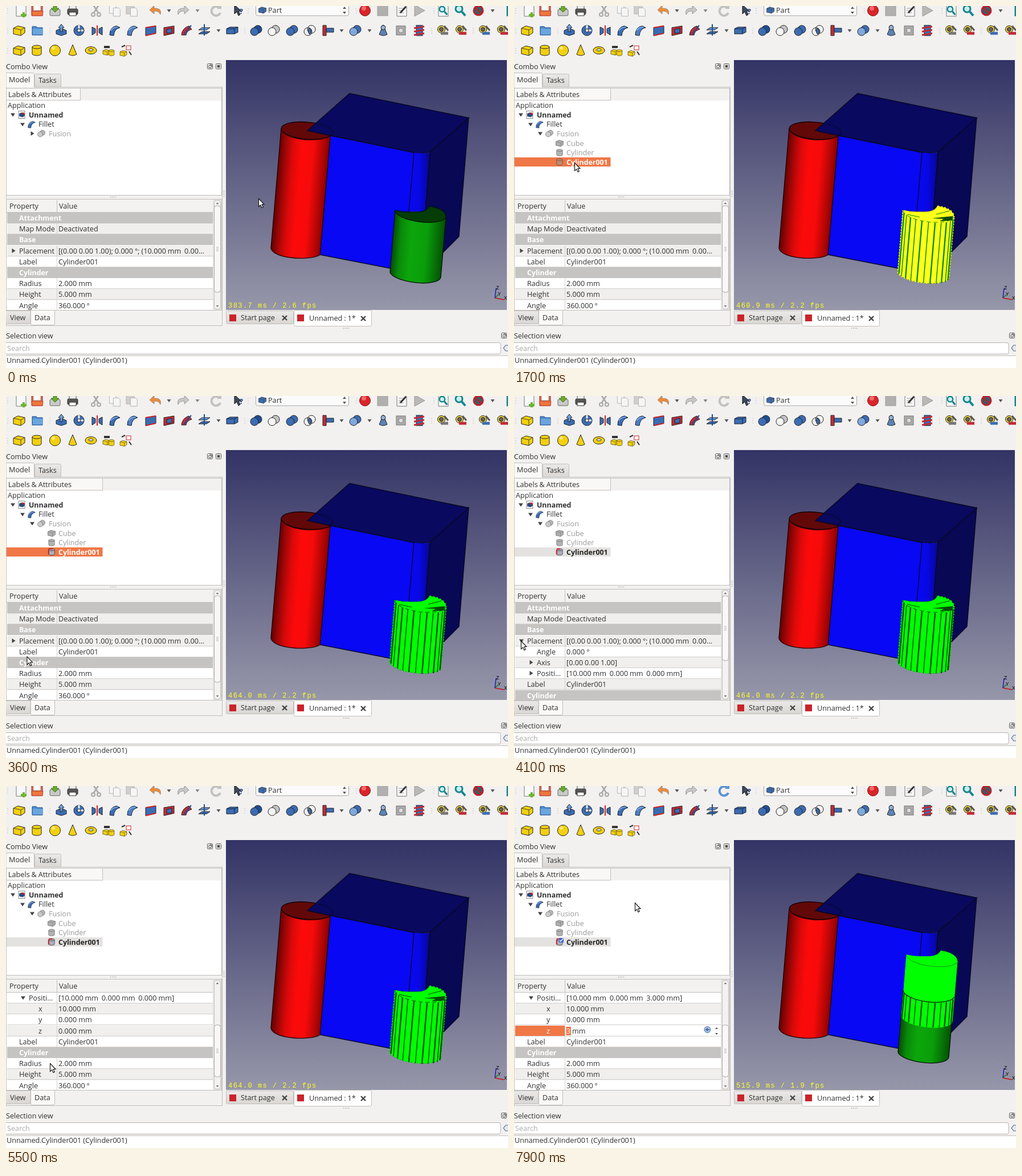
An HTML page for the animation above (8000 ms loop, 881x636 px).

```html
<!DOCTYPE html>
<html lang="en">
<head>
<meta charset="utf-8">
<title>Moving a cylinder</title>
<style>
html, body { margin: 0; width: 100%; height: 100%; overflow: hidden; background: #f2f1f0; }
svg { display: block; }
text { font: 12.65px "Open Sans", "Noto Sans", sans-serif; word-spacing: -.4px; fill: #303030; white-space: pre; }
.b { font-weight: 700; font-size: 12.4px; }
.fps { font: 12px "Liberation Mono", monospace; letter-spacing: 1.45px; word-spacing: 0; fill: #ffff20; }
.axis { font: 9px "Liberation Mono", monospace; fill: #000; }
</style>
</head>
<body>
<svg id="stage" width="881" height="636" viewBox="0 0 881 636">
  <defs>
    <linearGradient id="sky" x2="0" y2="1"><stop stop-color="#333365"/><stop offset="1" stop-color="#9797aa"/></linearGradient>
    <linearGradient id="red" gradientUnits="userSpaceOnUse" x1="474" y1="320" x2="561" y2="327">
      <stop stop-color="#600"/><stop offset=".12" stop-color="#9c0606"/><stop offset=".28" stop-color="#dc0909"/>
      <stop offset=".45" stop-color="#fd0a0a"/><stop offset=".68" stop-color="#f60a0a"/><stop offset=".9" stop-color="#ac0505"/><stop offset="1" stop-color="#800"/>
    </linearGradient>
    <linearGradient id="green" gradientUnits="userSpaceOnUse" x1="679" y1="420" x2="768" y2="427">
      <stop stop-color="#065006"/><stop offset=".14" stop-color="#098a09"/><stop offset=".35" stop-color="#0ca60c"/>
      <stop offset=".65" stop-color="#0a9e0a"/><stop offset="1" stop-color="#045004"/>
    </linearGradient>
    <linearGradient id="round"><stop stop-color="#0808f4"/><stop offset=".5" stop-color="#0808e4"/><stop offset="1" stop-color="#060690"/></linearGradient>
    <linearGradient id="tab" x2="0" y2="1"><stop stop-color="#ebe9e7"/><stop offset="1" stop-color="#d9d6d3"/></linearGradient>
    <clipPath id="rows"><rect x="2" y="363" width="361" height="171"/></clipPath>
    <clipPath id="view"><rect x="386" y="95" width="493" height="439"/></clipPath>
  </defs>
  <g id="frame"></g><g id="tree"></g><g id="props"></g><g id="scene" clip-path="url(#view)"></g><g id="sync"></g><g id="pointer"></g>
</svg>
<script>
const LOOP = 8000, TICK = 100;
const YEL = '#f3d00f', BLU = '#3b6cb3', NAVY = '#1d4e95', GREY = '#a9a8a6', ORANGE = '#f07746', LINE = '#c2bfbb';
const $ = id => document.getElementById(id);

const path = (d, fill = 'none', stroke = '#222', w = 1, more = '') =>
  `<path d="${d}" fill="${fill}" stroke="${stroke}" stroke-width="${w}" ${more}/>`;
const rect = (x, y, w, h, fill, stroke = 'none', r = 0) =>
  `<rect x="${x}" y="${y}" width="${w}" height="${h}" rx="${r}" fill="${fill}" stroke="${stroke}"/>`;
const disc = (x, y, r, fill, stroke = '#222', w = 1) =>
  `<circle cx="${x}" cy="${y}" r="${r}" fill="${fill}" stroke="${stroke}" stroke-width="${w}"/>`;
const text = (x, y, s, fill = '', cls = '') =>
  `<text x="${x}" y="${y}" class="${cls}" ${fill && `style="fill:${fill}"`}>${s.replace('&', '&amp;')}</text>`;
const at = (x, y, s, k = 1) => `<g transform="translate(${x} ${y}) scale(${k})">${s}</g>`;
const faded = s => `<g opacity=".7">${s}</g>`;

// Toolbar glyphs, drawn around their own centre
const cube = c => path('M-10-4L-2-8L10-5V4L3 9L-10 6Z', c) + path('M-10-4L3-1L10-5M3-1V9', 'none', '#443');
const drum = c => path('M-8-6V6A8 3 0 0 0 8 6V-6Z', c) + `<ellipse cy="-6" rx="8" ry="3" fill="${c}" stroke="#222"/>`;
const cone = c => path('M0-10L7 7Q0 11-7 7Z', c);
const ring = c => `<ellipse rx="10" ry="6.5" fill="${c}" stroke="#222"/><ellipse cy="-1" rx="4" ry="2" fill="#eee" stroke="#222"/>`;
const fan = c => path('M-9 8Q-9-6 3-8L9-5Q-1-3-2 9Z', c, '#123') + path('M-7 0Q-3-6 5-6', 'none', '#8db4e8', 1.5);
const slab = c => path('M-9-5L9-8V5L-9 9Z', c);
const pair = (a, b) => disc(3, -2, 7, b) + disc(-3, 2, 7, a);
const page = () => path('M-8-11H5L9-7V10H-8Z', '#f8f8f8', '#777');
const lens = c => disc(-2, -3, 6, '#c9eef0', c, 3) + path('M3 2L9 9', 'none', c, 4);
const curl = c => path('M9 7Q12-5-2-4V-9L-10-1L-2 6V1Q6 0 9 7Z', c, '#8a8a8a', .8);
const drop = path('M-3.5-2H3.5L0 3Z', '#555', 'none');
const grip = path('M0-4V5', 'none', '#c9c6c2', 2, 'stroke-dasharray="1 3"');
const tape = c => disc(-3, -2, 6.5, '#e8cf42') + disc(-3, -2, 3.5, '#666') + path('M-4 5H9', 'none', c, 5) + path('M2-8L9 0', 'none', '#555', 3);
const spin = c => path('M7-4A8 8 0 1 0 8 4', 'none', c, 4) + path('M2-3H10V-11Z', c, 'none');

function toolbar() {
  const flip = s => `<g transform="scale(-1 1)">${s}</g>`;
  const save = rect(-9, -2, 18, 11, '#c9c9c9', '#666', 2) + path('M-3-11H3V-4H7L0 3L-7-4H-3Z', '#6aab2e', '#47781c');
  const row1 = [
    [26, page() + path('M5 3V12M0 8H10', 'none', '#69b52c', 4)],
    [55, path('M-10-9H9V9H-10Z', '#e45a32', '#a33') + path('M-7-12H6V0H-7Z', '#fafafa', '#999') + path('M-10 1H10L9 9H-9Z', '#f0763c', '#b43')],
    [86, save],
    [117, rect(-9, -3, 18, 10, '#555', '#333', 2) + rect(-6, -11, 12, 8, '#eee', '#555') + rect(-6, 3, 12, 6, '#fff', '#333')],
    [158, path('M-5-10L4 4M5-10L-4 4', 'none', GREY, 2.5) + disc(-5, 7, 3, 'none', GREY, 2) + disc(5, 7, 3, 'none', GREY, 2)],
    [190, faded(at(-3, -2, page(), .7) + at(4, 3, page(), .7))],
    [220, faded(rect(-9, -10, 14, 16, '#c4c2bf', '#999') + at(4, 3, page(), .7))],
    [262, curl('#f08a35')], [286, drop], [311, flip(curl('#c9c8c6'))], [336, faded(drop)],
    [409, path('M-8-10V6L-4 2L-1 9L2 7L-1 1H4Z', '#3c4a5c', '#111') + text(1, 6, '?', '#173a8c', 'b')],
    [630, disc(0, 0, 9.5, '#d9252a', '#8c1014') + disc(-2, -4, 4, '#f06a6a', 'none')],
    [661, rect(-9, -9, 18, 18, '#b2b0ae', '#999')],
    [694, page() + path('M-5-4H4M-5 0H2M-5 4H4', 'none', '#999') + path('M-2 4L8-7', 'none', '#333', 3)],
    [725, path('M-8-10L10 0L-8 10Z', '#b9b8b5', '#999')],
    [767, page() + at(0, 0, lens('#16858f'), .8)], [797, lens('#16858f')],
    [829, disc(0, 0, 8, '#28656c', '#c21d2a', 3) + path('M-6-6L6 6', 'none', '#c21d2a', 3)], [854, drop],
    [884, path('M-4-10V10', 'none', '#16858f', 3)]
  ];
  const row2 = [
    [23, cube(YEL)], [55, path('M-9-7H-2L0-5H9V8H-9Z', '#4e8ccb', NAVY) + rect(-8, -3, 17, 10, '#6ba5dd')],
    [97, path('M-9 0L0-4L9 0V6L0 9L-9 6Z', BLU) + path('M0-11L5-5H2V2H-2V-5H-5Z', '#6ea3e0')],
    [128, disc(0, 0, 9, BLU) + path('M0-9V0H8', 'none', '#e9f0fa', 3) + disc(0, 0, 3, '#ddd')],
    [160, path('M-9-6L-3-3V4L-9 8ZM9-6L3-3V4L9 8Z', BLU) + path('M0-9V9', 'none', '#c22', 2)],
    [191, fan(BLU)], [222, fan('#4e7fc4')], [254, slab(BLU) + path('M-9-5L9-8M-9 9L9 5', 'none', '#c22', 2)],
    [286, slab('#c22b36') + path('M-4-2L5-4V4L-4 5Z', BLU)],
    [317, path('M-9 8Q-8-4 4-8L9-2Q0 0-1 8Z', '#c22b36') + path('M-5 7L8-9', 'none', NAVY, 2)],
    [348, path('M-10 6L-4 2H10L4 6Z', BLU) + path('M-10-1L-4-5H10L4-1Z', '#6b9adb') + path('M0-11V9', 'none', NAVY, 2)], [373, drop],
    [397, path('M-10-3L-4-6H10V3L4 6H-10Z', BLU) + path('M-10-3H4L10-6M4-3V6', 'none', '#124')],
    [439, pair(BLU, NAVY)], [470, pair('#f5f5f5', '#c4c4c4')], [502, pair(BLU, BLU)],
    [533, pair('none', '#f2f2f2') + path('M-1-5Q6 0 0 7Q-5 2-1-5', BLU)],
    [565, path('M-9-9H-3V9H-9Z', '#c22b36') + path('M-3-4H10V3H-3Z', BLU)], [589, drop],
    [613, pair('#7fa8dc', BLU)], [638, drop], [662, cone('#5b83b5') + disc(0, -5, 4, '#92b2d8')],
    [693, rect(-8, -8, 16, 16, '#aaa', '#777') + disc(0, 0, 4, '#ddd', '#888')],
    [725, rect(-5, -9, 11, 18, BLU, '#123') + path('M-9-4L9-7M-9 2L9-1M-9 8L9 5', 'none', '#c22b36', 3)],
    [767, tape('#777')], [799, tape('#c22b36')], [840, tape(BLU)], [872, tape('#c22b36')]
  ];
  const row3 = [
    [23, cube(YEL)], [54, drum(YEL)], [86, disc(0, 0, 9.5, YEL) + disc(-3, -4, 3, '#fbe879', 'none')], [117, cone(YEL)], [149, ring(YEL)],
    [180, at(-4, 3, cube(YEL), .6) + at(5, 4, drum(YEL), .6) + path('M-8-6H2', 'none', '#333', 4)],
    [211, at(-5, 5, cube(YEL), .6) + rect(0, -8, 8, 7, '#fff', '#c22') + path('M-8-6L-2-9M5 2L9 8', 'none', '#333', 2)]
  ];
  let s = '';
  [row1, row2, row3].forEach((row, i) => row.forEach(([x, g]) => s += at(x, [8, 43, 78][i], g)));
  [[3, 8], [425, 8], [615, 8], [751, 8], [3, 43], [77, 43], [419, 43], [747, 43], [820, 43], [3, 78]].forEach(([x, y]) => s += at(x, y, grip));
  s += rect(438.5, -6, 163, 23, '#fbfbfb', '#aaa6a2', 3) + at(450, 7, cube(BLU), .65) + text(460, 12, 'Part');
  return s + path('M591 5L594 1L597 5ZM591 10L594 14L597 10Z', '#555', 'none');
}

const floater = (x, y) => at(x, y, rect(-4.5, -4.5, 9, 9, '#f6f5f4', '#555', 1) + rect(-2, -1.5, 4, 4, 'none', '#555') + path('M0-3H3V1', 'none', '#555'));
const cross = (x, y, r) => at(x, y, path(`M${-r} ${-r}L${r} ${r}M${r} ${-r}L${-r} ${r}`, 'none', '#444', 2.4));
const dots = (x, y, d) => path(`M${x} ${y}${d}`, 'none', '#aaa6a2', 2, 'stroke-dasharray="1 2"');

function chrome() {
  return rect(0, 0, 881, 636, '#f2f1f0') + toolbar() +
    text(0, 111, 'Combo View') + floater(358, 106) + rect(368.5, 101.5, 9, 9, '#f6f5f4', '#555', 1) + cross(373, 106, 2) +
    rect(50.5, 119.5, 46, 24, 'url(#tab)', LINE, 2) + text(57, 135, 'Tasks') +
    rect(.5, 142.5, 379, 419, '#f2f1f0', LINE) +
    path('M0 143V117.500H47Q49.500 117.500 49.500 120V143', '#f9f8f7', LINE) + text(5, 134, 'Model') +
    rect(.5, 144.5, 378, 188, '#fff', LINE) +
    rect(.5, 339.5, 378, 195, '#fff', LINE) + rect(1, 340, 362, 22, '#f3f2f1') + path('M1 362.500H363M89.500 341V362', 'none', LINE) +
    text(6, 356, 'Property') + text(93, 356, 'Value') +
    rect(-2, 535.5, 45, 23, 'url(#tab)', LINE, 2) + text(7, 552, 'View') +
    path('M43.500 535V558Q43.500 560.500 46 560.500H83Q85.500 560.500 85.500 558V535', '#faf9f8', LINE) + text(50, 552, 'Data') +
    dots(183, 335.5, 'H195') + dots(382.5, 325, 'V337') + dots(592, 566, 'H602') +
    rect(386.5, 535.5, 118, 23, 'url(#tab)', LINE, 2) + rect(392, 542, 12, 12, '#cc2229') + text(412, 552, 'Start page') + cross(489, 548, 4) +
    rect(505.5, 534.5, 136, 28, '#fff', LINE, 2) + rect(511, 542, 12, 12, '#cc2229') + text(532, 553, 'Unnamed : 1*') + cross(627, 549, 4) +
    text(0, 584, 'Selection view') + floater(874, 579) +
    rect(-3, 591.5, 871, 20, '#fff', '#b5b1ad', 3) + text(2, 606, 'Search', '#aaa') +
    path('M873 601L877 596H884V606H877Z', '#e5e8ee', '#4d6a97', 1.2) +
    rect(0, 614, 881, 22, '#fff') + path('M0 614.500H881', 'none', LINE) + text(1, 627, 'Unnamed.Cylinder001 (Cylinder001)');
}

const arrow = (x, y, open) => at(x, y, path(open ? 'M-4-2.500H4L0 3.500Z' : 'M-2.500-4V4L3.500 0Z', '#444', 'none'));

function tree(s) {
  const w = s.open ? 169 : 130, dim = '#9a9a9a';
  let o = rect(1, 145, 377, 21, '#f2f1f0') + rect(.5, 144.5, w, 21, '#f9f8f7', LINE) + text(4, 160, 'Labels & Attributes') +
    text(3, 179, 'Application') + arrow(12, 191, 1) +
    at(28, 191, rect(-6, -6.5, 11, 13, '#fff', '#888') + at(0, 0, cube(NAVY), .45) + disc(2, -2, 2, '#c22', 'none')) + text(40, 196, 'Unnamed', '', 'b') +
    arrow(29, 208, 1) + at(45, 208, fan(BLU), .7) + text(57, 212, 'Fillet') +
    arrow(46, 224, s.open) + faded(at(62, 224, pair('#b5b5b5', '#999'), .65)) + text(75, 229, 'Fusion', dim);
  if (!s.open) return o;
  o += faded(at(80, 241, cube('#8c8c8c'), .65)) + text(92, 246, 'Cube', dim) +
    faded(at(80, 257.5, drum('#949494'), .65)) + text(92, 262, 'Cylinder', dim) +
    rect(1, 266, 168.5, 16, s.focus ? ORANGE : '#e4e2e0') +
    at(80, 274, s.shown ? drum('#a9b0bd') + path('M-8-6V7M-8-8H2', 'none', '#c8202a', 3) : faded(drum('#b09080')), .65) +
    text(92, 279, 'Cylinder001', s.focus ? '#fff' : '#222', 'b');
  if (s.touched) o += at(83, 271, rect(-4, -4, 8, 8, '#3560d0', 'none', 2) + path('M-3 0L-1 2L3-3', 'none', '#fff', 1.5));
  return o;
}

function props(s) {
  const coord = `[10.000 mm  0.000 mm  ${s.placed}.000 mm]`;
  const list = [
    ['Attachment'], ['Map Mode', 'Deactivated', 0], ['Base'],
    ['Placement', '[(0.00 0.00 1.00); 0.000 °; (10.000 mm  0.00…', 0, s.place ? 2 : 1]
  ];
  if (s.place) list.push(['Angle', '0.000 °', 1], ['Axis', '[0.00 0.00 1.00]', 1, 1], ['Positi…', coord, 1, s.pos ? 2 : 1]);
  if (s.pos) list.push(['x', '10.000 mm', 2], ['y', '0.000 mm', 2], ['z', '0.000 mm', 2]);
  list.push(['Label', 'Cylinder001', 0], ['Cylinder'], ['Radius', '2.000 mm', 0], ['Height', '5.000 mm', 0], ['Angle', '360.000 °', 0]);

  let o = '<g clip-path="url(#rows)">';
  list.forEach(([name, value, depth, mark], i) => {
    const y = Math.round(363 + 19.2 * (i - s.scroll)), base = y + 14;
    if (value === undefined) {
      o += rect(1, y, 362, 19, '#c6c4c2') + text(23, base, name, '#fff', 'b');
      return;
    }
    const edit = name === 'z' && s.edit;
    o += rect(1, y, 362, 20, i % 2 && !edit ? '#f0efee' : '#fff');
    if (edit) o += rect(1, y, 88, 19, ORANGE);
    o += path(`M1 ${y + 18.5}H363M89.500 ${y}V${y + 19}`, 'none', '#d2cfcc');
    o += text(23 + 17 * depth, base, name, edit ? '#fff' : '');
    if (mark) o += arrow(13 + 17 * depth, y + 9, mark === 2);
    if (!edit) o += text(92, base, value);
    else o += rect(91.5, y + 2, 8.5, 15, ORANGE) + text(92, base, String(s.z), '#fff') + text(102, base, 'mm') +
      disc(339.5, y + 7, 5.5, '#a9c2e2', '#48719f') + path(`M336 ${y + 7}H343M339 ${y + 4}V${y + 10}`, 'none', '#2c5688', 1.3) +
      path(`M353 ${y + 6}L355.500 ${y + 3}L358 ${y + 6}ZM353 ${y + 13}L355.500 ${y + 16}L358 ${y + 13}Z`, '#555', 'none');
  });
  const len = 1368 / list.length, top = 351 + s.scroll / list.length * 172, mid = top + len / 2;
  return o + '</g>' + rect(363, 340, 15, 194, '#e6e4e2') + rect(365.5, 341.5, 11, 191, '#f3f2f1', LINE, 4) +
    rect(365.5, top, 11, len, '#f9f8f7', '#aaa6a2', 4) + path(`M369 ${mid - 3}h4m-4 3h4m-4 3h4`, 'none', '#aaa') +
    path('M368.500 348L371 345L373.500 348ZM368.500 526L371 529L373.500 526Z', '#777', 'none');
}

const RIM = 'M683 359A45 15 7 0 0 772 371';
const SIDE = RIM + 'L763 476A45 15 7 0 1 674 468Z';
const CAP = RIM + 'Q771 356 743 352C740 358 733 362 720 362H707Q694 362 683 359Z';

function stripes(c) {
  const n = 12;
  let s = '';
  for (let i = 1; i < n; i++) {
    const a = Math.PI * i / n, x = 727.5 - 44.5 * Math.cos(a), y = 365 - 6 * Math.cos(a) + 15 * Math.sin(a);
    s += path(`M${x} ${y}l-9 107`, 'none', c, i % 2 ? 2.4 : 1.5);
  }
  return s;
}

function block() {
  const ink = '#080820';
  return path('M744 257L812 196.500L795 405L760 440H730Z', '#080855', ink, 1.3) +
    '<ellipse cx="528.5" cy="219" rx="45.5" ry="15" transform="rotate(5 528.5 219)" fill="#620808" stroke="#100" stroke-width="1.3"/>' +
    path('M529 219L603 153.500L812 196.500L746 255Q738 260 716 257.500L569 227.500Z', '#090960', ink, 1.4) +
    path('M541 206Q570 210 574 222L569 229', 'none', ink, 1.2) +
    path('M569 227.500L716 257.500L700 466L551 437Z', '#0808f4', ink, 1.4) +
    path('M716 257.500Q735 260 744 257L736 361L707 361Z', 'url(#round)', 'none') + path('M716 258L707 361M744 257L736 361', 'none', ink, 1.2) +
    path('M483 215Q487 231 527 235Q552 236 569 229L551 437Q541 444 509 443Q470 440 465 426Z', 'url(#red)', '#200', 1.4);
}
const solid = block() + path(SIDE, 'url(#green)', '#021802', 1.4) + path(CAP, '#053d05', '#021802', 1.3);

function picked(s) {
  if (!s.tint) return '';
  const c = s.tint, ink = c === '#0f0' ? '#064a06' : '#0b8a0b';
  const move = `transform="translate(${2 * s.z} ${-20.8 * s.z})"`;
  let o = path(SIDE, c, c, 1, move) + path(CAP, c, c, 1, move);
  if (s.z) {
    o += `<clipPath id="cut"><path d="${SIDE}" ${move}/></clipPath><g clip-path="url(#cut)">${stripes(ink)}</g>` + path(RIM, 'none', '#042004', 1.3);
    return s.z === 3 ? o + path(RIM, 'none', '#0b9c0b', 1, move) : o;
  }
  return o + path(SIDE, 'none', c, 3, 'stroke-dasharray="2 3"') + stripes(ink) +
    path('M733 373L771 369L769 377L747 378L754 374Z', '#064a06', 'none') + path('M741 366L764 360M690 366L712 371', 'none', ink, 1.2) +
    path(RIM, 'none', ink, 1, 'stroke-dasharray="7 5"') + path('M743 352Q771 356 772 371', 'none', c, 3, 'stroke-dasharray="3 3"');
}

const scene = s => rect(386, 95, 493, 439, 'url(#sky)') + solid + picked(s) +
  text(390, 530, s.fps, '', 'fps') +
  path('M858 513L864 507', 'none', '#0a7a0a', 1.3) + path('M858 513L860 496', 'none', '#1a1ac8', 1.5) + path('M858 513L874 516', 'none', '#c81414', 1.5) +
  text(860, 498, 'Z', '', 'axis') + text(863, 509, 'Y', '', 'axis') + text(874, 516, 'X', '', 'axis');

// Pointer stops: time, x, y of the tip
const STOPS = [
  [0, 443, 338], [700, 44, 224], [1000, 42, 222], [1500, 106, 275], [1800, 106, 275], [2700, 79, 462], [2900, 101, 490],
  [3100, 69, 494], [3200, 69, 494], [3900, 12, 430], [4100, 12, 430], [4600, 69, 496], [5000, 28, 485], [5200, 28, 485],
  [5500, 77, 487], [5900, 134, 443], [6000, 139, 430], [7600, 139, 430], [7900, 212, 205], [LOOP, 212, 205]
];
const FPS = [
  [0, '383.7 ms / 2.6 fps'], [300, '452.3 ms / 2.2 fps'], [1300, '455.8 ms / 2.2 fps'], [1700, '460.9 ms / 2.2 fps'],
  [1900, '464.0 ms / 2.2 fps'], [6700, '498.5 ms / 2.0 fps'], [6900, '514.0 ms / 1.9 fps'], [7100, '515.9 ms / 1.9 fps']
];

function pointer(t) {
  if (t >= 6200 && t < 7700) {
    const beam = 'M-3-7H-1L0-6L1-7H3M0-6V6M-3 7H-1L0 6L1 7H3';
    return at(141.5, 433, path(beam, 'none', '#fff', 3) + path(beam, 'none', '#000', 1.4));
  }
  const i = STOPS.findIndex(k => k[0] > t), [t0, x0, y0] = STOPS[i - 1], [t1, x1, y1] = STOPS[i];
  const k = (t - t0) / (t1 - t0);
  return at(x0 + (x1 - x0) * k, y0 + (y1 - y0) * k, path('M.5.5V14.500L3.700 11.600L6 16.500L8.300 15.500L6 10.500H10Z', '#fff', '#111', 1.1));
}

const stateAt = t => ({
  open: t >= 800, focus: t < 4000, shown: t >= 1900, touched: t >= 7100,
  place: t >= 4000, pos: t >= 5100, scroll: t >= 5300 ? 6 : 0, edit: t >= 6200,
  z: t >= 7100 ? 3 : t >= 6900 ? 2 : t >= 6700 ? 1 : 0, placed: t >= 7200 ? 3 : 0,
  tint: t >= 1900 ? '#0f0' : t >= 1700 ? '#ffff1c' : '',
  fps: FPS.filter(f => f[0] <= t).pop()[1]
});

const shown = {};
function put(id, s) {
  if (shown[id] !== s) $(id).innerHTML = shown[id] = s;
}

const start = performance.now();
function draw() {
  const t = Math.floor((performance.now() - start) % LOOP / TICK) * TICK, s = stateAt(t);
  put('tree', tree(s));
  put('props', props(s));
  put('scene', scene(s));
  put('sync', at(368, 8, spin(t >= 6900 ? '#5b93d3' : '#c3c1be')));
  put('pointer', pointer(t));
  requestAnimationFrame(draw);
}
put('frame', chrome());
draw();
</script>
</body>
</html>
```
